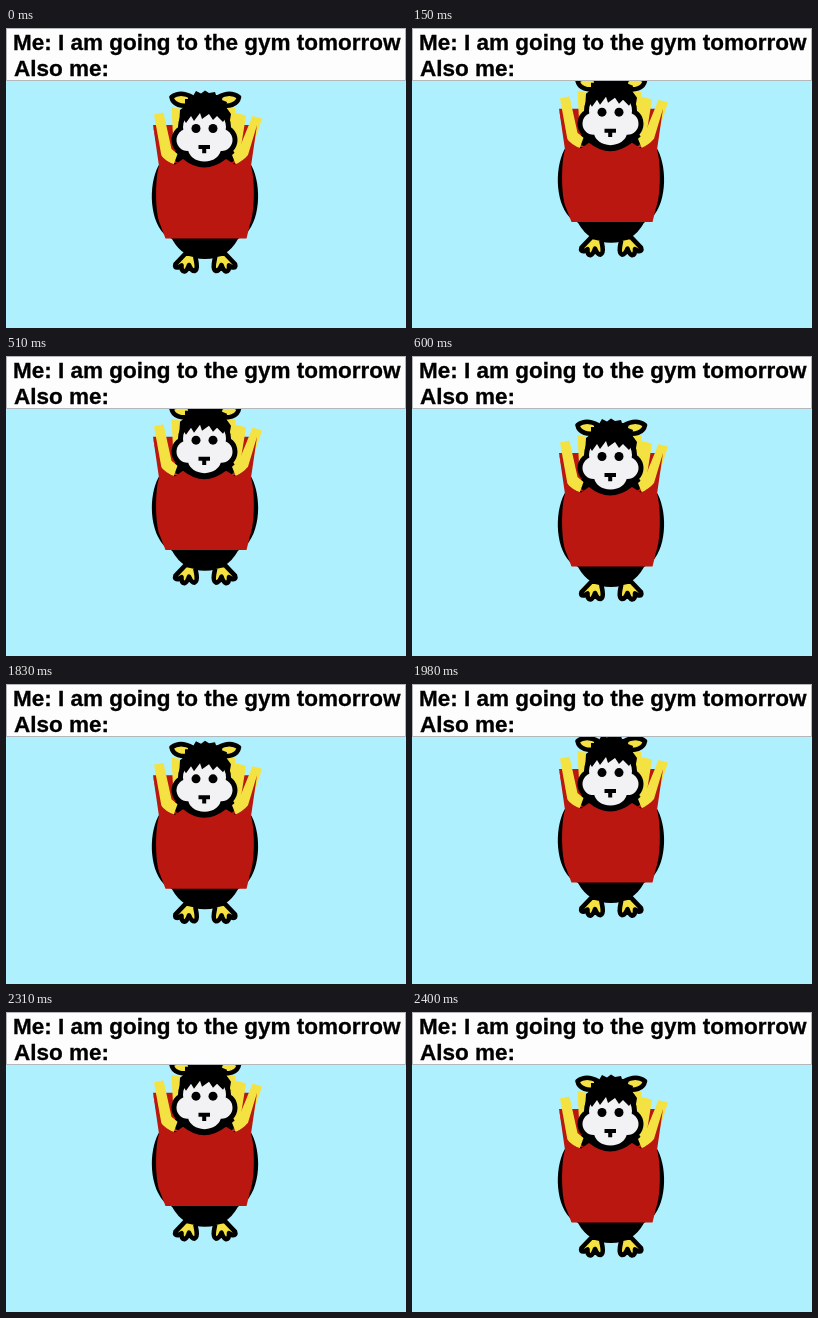
Animation of 400 by 300 pixels, one loop 4500 ms. Source, as an HTML page:

```html
<!DOCTYPE html>
<html lang="en">
<head>
<meta charset="utf-8">
<title>Gym tomorrow</title>
<style>
  html, body { margin: 0; width: 100%; height: 100%; overflow: hidden; background: #aef0fe; }
  svg { display: block; width: 100%; height: 100%; }
  text { font: bold 22.5px "Liberation Sans", Arial, sans-serif; fill: #000; stroke: #000; stroke-width: .3; }
  .red { fill: #ba1710; }
  .fry { fill: #f4e242; }
  .ink { fill: #000; }
  .limb { fill: #f4e242; stroke: #000; stroke-width: 4.6; stroke-linejoin: round; }
  .outline { fill: #000; stroke: #000; stroke-width: 10; }
  .skin { fill: #f2f2f4; }
</style>
</head>
<body>
<svg viewBox="0 0 400 300">
  <defs>
    <path id="foot" class="limb" d="M180 225L169.500 236Q168 240 172 239.500L175.500 237.500Q175 243 178.500 243.500Q181 243 183 237Q185.500 243 188.500 243Q191.500 242 190.500 235L189 227Z"/>
    <path id="ear" class="limb" d="M184 77C176 79 167 77 165.500 69C171 65 178 64.500 186 69Z"/>
    <g id="face">
      <ellipse cx="198.500" cy="99" rx="21.500" ry="19"/>
      <circle cx="181.500" cy="112" r="11"/>
      <circle cx="215.500" cy="112" r="11"/>
      <ellipse cx="198.500" cy="120.500" rx="16.500" ry="13"/>
    </g>
  </defs>
  <rect width="400" height="300" fill="#aef0fe"/>
  <g id="hopper">
    <path class="ink" d="M154 135C143 152 142 189 158 206L166 211Q177 231 199 231Q221 231 232 211L240 206C256 189 255 152 244 135Z"/>
    <use href="#foot"/>
    <use href="#foot" transform="matrix(-1 0 0 1 398.500 0)"/>
    <path class="red" d="M147 97H251L244 135H154Z"/>
    <path class="fry" d="M165.500 79L175 81L178 100L167 108Z M222 79L229 80L231 104L222 104Z M230 85L240 87.500L234 125L225 128Z"/>
    <ellipse class="ink" cx="198.500" cy="128" rx="31" ry="14"/>
    <path class="fry" d="M148 86.500L157.500 84.500L165.500 121L171.500 126L167.500 137L156 131Z M246.500 88L256 90.500L243 131L230 137L226 127L233 121Z"/>
    <path class="red" d="M147 97L154 126Q160 134 169 136.500L177 131Q198 148 220 131L229 136.500Q237 133 242 127L251 97L245 138C249 150 249 185 244 196L240.500 210.400H159.500L154 196C149 185 149 150 153 138Z"/>
    <use href="#ear"/>
    <use href="#ear" transform="matrix(-1 0 0 1 398.500 0)"/>
    <use href="#face" class="outline"/>
    <use href="#face" class="skin"/>
    <path class="ink" d="M173 98L174 82L179 78L179 71L182 71L182 67L187 68L190 63L195 65.500L199 62.500L203 65L209 64L210 67L217 67L216 72L221 74L220 79L225 86L223 98L219 91L217 94L211 88L207 92L203 86L196 91L194 85L188 93L185 88L180 95L178 92Z"/>
    <circle class="ink" cx="190" cy="100.500" r="4.500"/>
    <circle class="ink" cx="207" cy="100.500" r="4.500"/>
    <path class="ink" d="M192.500 117H204V121H200.200V125.300H196.200V121H192.500Z"/>
  </g>
  <rect x=".5" y=".5" width="399" height="52" fill="#fdfdfd" stroke="#b4b8ba"/>
  <text x="7" y="21.600">Me: I am going to the gym tomorrow</text>
  <text x="8" y="47.700">Also me:</text>
</svg>
<script>
  const LOOP = 4500, STEP = 30, STEPS = 8, HEIGHT = 18;
  const hops = [30, 390, 1830, 2190];
  const hopper = document.getElementById('hopper');

  function lift(t) {
    const start = hops.find(h => t >= h && t < h + STEP * (STEPS - 1));
    if (start === undefined) return 0;
    const k = Math.floor((t - start) / STEP) + 1;
    return HEIGHT * Math.sin(Math.PI * k / STEPS) ** 1.2;
  }

  function draw(t) {
    hopper.setAttribute('transform', `translate(0 ${-lift(t).toFixed(2)})`);
  }

  const begin = performance.now();
  function tick() {
    draw((performance.now() - begin) % LOOP);
    requestAnimationFrame(tick);
  }
  tick();
</script>
</body>
</html>
```
